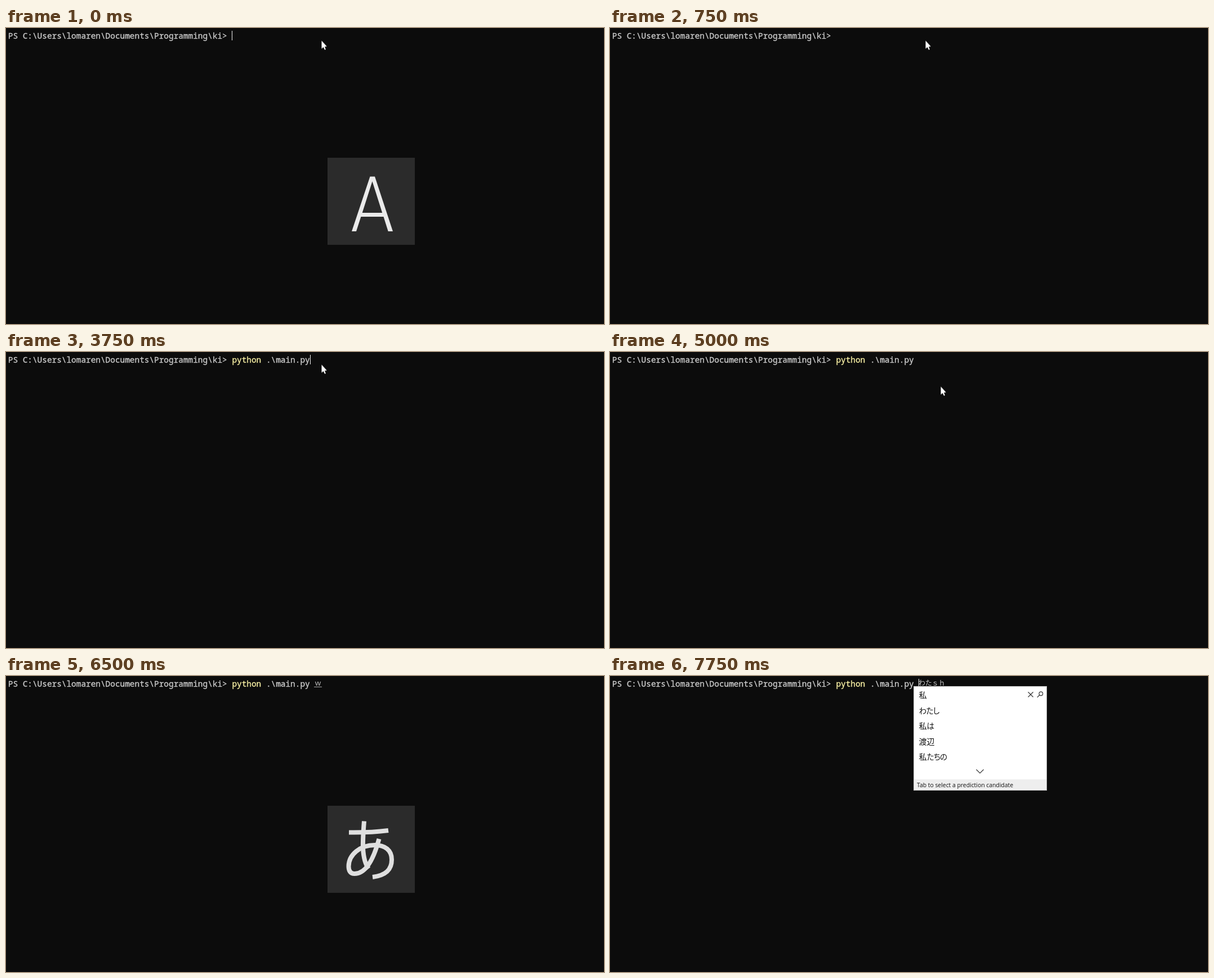
Recreate the animation shown at these times as an HTML page. Size 1062x527 px, loop 8 s.

```html
<!DOCTYPE html>
<html lang="ja">
<head>
<meta charset="utf-8">
<title>Terminal with Japanese input</title>
<style>
html, body { margin: 0; width: 100%; height: 100%; overflow: hidden; background: #0c0c0c; }
svg { display: block; width: 1062px; height: 527px; }
text { white-space: pre; }

.shell { font: 14.417px "Noto Sans Mono", "DejaVu Sans Mono", monospace; fill: #ccc; stroke: #ccc; stroke-width: .35px; font-variant-ligatures: none; }
.command { fill: #f9f1a5; stroke: #f9f1a5; }
.compose { font: 300 12px "Noto Sans CJK JP", "Noto Sans CJK", sans-serif; fill: #ccc; }
.item { font: 14px "Noto Sans CJK JP", "Noto Sans CJK", sans-serif; fill: #111; }
.hint { font: 10.4px "Open Sans", "Noto Sans", sans-serif; fill: #111; }
.kana { font-feature-settings: "palt"; }
.item .kana { font-size: 13.5px; letter-spacing: -.6px; }
.icon { fill: none; stroke: #333; stroke-width: 1.2; }

/* every change is a hard cut on one shared 8 s clock */
.typing, .caret, .pointer, .badge, .glyph, .latin, .kanaMode,
.key-w, .key-wa, .key-ta, .key-s, .key-h, .popup, .first, .second {
  animation: 8s step-end infinite;
}
.typing { animation-name: typing; }
.caret { animation-name: blink; }
.pointer { animation-name: pointer; }
.badge { animation-name: badge; }
.glyph { animation-name: glyph; }
.latin { animation-name: latin; }
.kanaMode { animation-name: kanaMode; }
.key-w { animation-name: keyW; }
.key-wa, .popup { animation-name: after6750; }
.key-ta, .second { animation-name: after7000; }
.key-s { animation-name: after7250; }
.key-h { animation-name: after7500; }
.first { animation-name: first; }

@keyframes typing {
  0% { transform: translateX(401px); }
  12.5% { transform: translateX(410px); }
  15.625% { transform: translateX(418px); }
  21.875% { transform: translateX(427px); }
  31.25% { transform: translateX(436px); }
  34.375% { transform: translateX(444px); }
  37.5% { transform: translateX(462px); }
  46.875% { transform: translateX(540px); }
  56.25%, 100% { transform: translateX(548px); }
}
@keyframes blink {
  0%, 12.5%, 31.25%, 71.875%, 84.375%, 96.875% { visibility: visible; }
  6.25%, 28.125%, 62.5%, 78.125%, 90.625% { visibility: hidden; }
}
@keyframes pointer {
  0% { transform: translate(560px, 22.6px); visibility: visible; }
  62.5% { transform: translate(587px, 61.6px); visibility: visible; }
  65.625% { transform: translate(931px, 433.6px); visibility: visible; }
  68.75%, 100% { transform: translate(931px, 433.6px); visibility: hidden; }
}
@keyframes badge {
  0%, 78.125% { opacity: 1; }
  9.375%, 87.5%, 100% { opacity: 0; }
  84.375% { opacity: .1; }
}
@keyframes glyph {
  0%, 78.125% { fill: #eaeaea; stroke: #eaeaea; }
  6.25%, 81.25%, 100% { fill: #dfdfdf; stroke: #dfdfdf; }
}
@keyframes latin {
  0% { visibility: visible; }
  9.375%, 100% { visibility: hidden; }
}
@keyframes kanaMode {
  0% { visibility: hidden; }
  78.125%, 100% { visibility: visible; }
}
@keyframes keyW {
  0%, 84.375%, 100% { visibility: hidden; }
  81.25% { visibility: visible; }
}
@keyframes after6750 {
  0% { visibility: hidden; }
  84.375%, 100% { visibility: visible; }
}
@keyframes after7000 {
  0% { visibility: hidden; }
  87.5%, 100% { visibility: visible; }
}
@keyframes after7250 {
  0% { visibility: hidden; }
  90.625%, 100% { visibility: visible; }
}
@keyframes after7500 {
  0% { visibility: hidden; }
  93.75%, 100% { visibility: visible; }
}
@keyframes first {
  0%, 87.5%, 100% { visibility: hidden; }
  84.375% { visibility: visible; }
}
</style>
</head>
<body>
<svg viewBox="0 0 1062 527">
  <rect width="1062" height="527" fill="#0c0c0c"/>

  <text class="shell" x="3.75" y="19">PS C:\Users\lomaren\Documents\Programming\ki> <tspan class="command">python</tspan> .\main.py</text>

  <!-- the cover hides what has not been typed yet -->
  <g class="typing">
    <rect y="2" width="150" height="24" fill="#0c0c0c"/>
    <rect class="caret" y="5" width="1" height="17" fill="#f2f2f2"/>
  </g>

  <!-- input mode badge -->
  <g class="badge">
    <rect x="571" y="231" width="155" height="155" fill="#2b2b2b"/>
    <g class="latin">
      <path class="glyph" stroke-width="0" fill-rule="evenodd" d="M614 362L646.5 264.5H655L687 362H678.7L670.5 336H630.4L622 362ZM632.7 329H668.2L650.5 273Z"/>
    </g>
    <g class="kanaMode">
      <g class="glyph" stroke-width="8">
        <path fill="none" d="M609 278.5Q648 279 679 275"/>
        <path fill="none" d="M636 258.5Q633.5 290 634 307Q635.5 332 644 343"/>
        <path fill="none" d="M662.5 290C654 322 641 352 619 352C611 352 608.5 346 608.5 339C608.5 318 629 301 655 301C673 301 685 310 685 327C685 345 674 355 651 358"/>
      </g>
    </g>
  </g>

  <!-- text being composed -->
  <g class="key-w">
    <text class="compose" x="548" y="17">ｗ</text>
    <rect x="547" y="19" width="14" height="1" fill="#aaa"/>
  </g>
  <text class="compose" x="548" y="17"><tspan class="kana key-wa">わ</tspan><tspan class="kana key-ta">た</tspan><tspan class="key-s">ｓ</tspan><tspan class="key-h">ｈ</tspan></text>

  <!-- candidate window -->
  <g class="popup">
    <rect x="539.5" y="18.5" width="236" height="185" fill="#fff" stroke="#bbb"/>
    <rect x="540" y="184" width="235" height="19" fill="#eee"/>
    <text class="item" x="548.5" y="39.3">私</text>
    <text class="item" x="548.5" y="66.7"><tspan class="kana">わたし</tspan></text>
    <path class="icon" d="M742.5 28.5L751.5 37.5M751.5 28.5L742.5 37.5"/>
    <path class="icon" d="M758.8 38L763 33.7"/>
    <circle class="icon" cx="765.3" cy="31.5" r="3.3"/>
    <path class="icon" d="M650.5 166.5L657 173L663.5 166.5"/>
    <text class="hint" x="545" y="198">Tab to select a prediction candidate</text>
  </g>
  <g class="first">
    <text class="item" x="548.5" y="94.1"><tspan class="kana">わばっかです</tspan></text>
    <text class="item" x="548.5" y="121.5">私<tspan class="kana">は</tspan></text>
    <text class="item" x="548.5" y="148.9">渡辺</text>
  </g>
  <g class="second">
    <text class="item" x="548.5" y="94.1">私<tspan class="kana">は</tspan></text>
    <text class="item" x="548.5" y="121.5">渡辺</text>
    <text class="item" x="548.5" y="148.9">私<tspan class="kana">たちの</tspan></text>
  </g>

  <path class="pointer" fill="#fff" d="M.5 0V14.3L3.7 11.4L6 16.3L8 15.4L5.9 10.7L9.8 10.2Z"/>
</svg>
</body>
</html>
```
